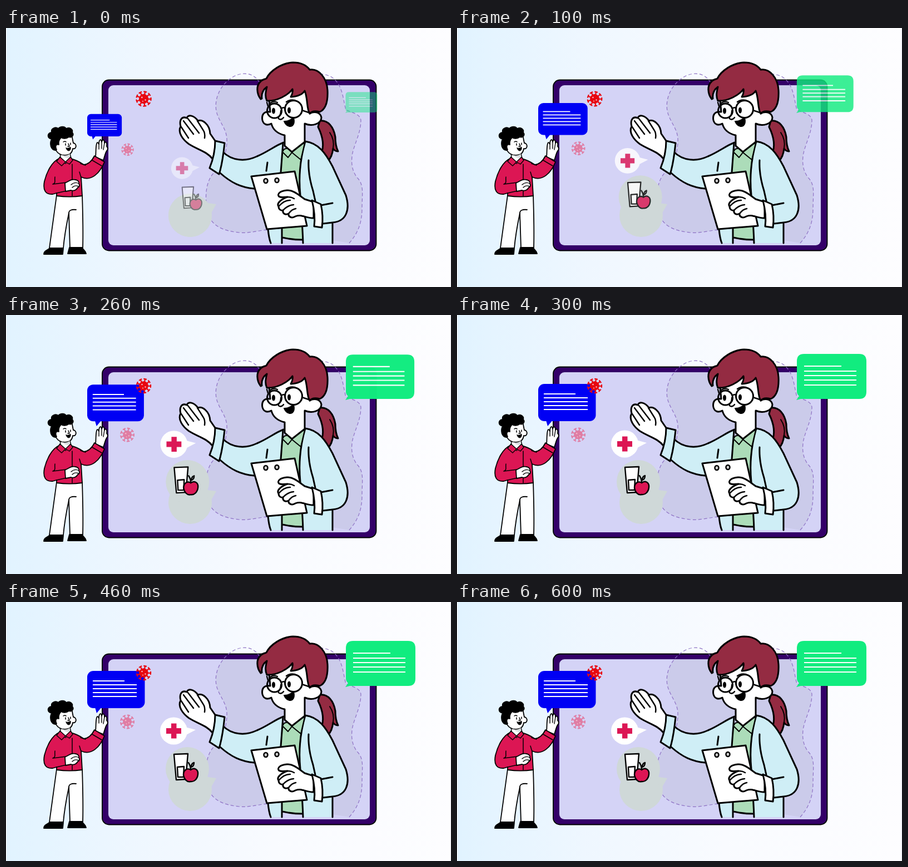
Write an HTML page that moves like this. It is 800x466 px and loops after 700 ms.

```html
<!DOCTYPE html>
<html lang="en">
<head>
<meta charset="utf-8">
<title>Online consultation</title>
<style>
  html, body { margin: 0; width: 100%; height: 100%; overflow: hidden; background: #fff; }
  svg { display: block; width: 100%; height: 100%; }
  .ink { stroke: #000; stroke-linecap: round; stroke-linejoin: round; fill: none; }
  .white { fill: #fff; }
  .coat { fill: #cfeef6; }
  .hair { fill: #942b42; }
  .shirt { fill: #acdcb9; }
  .red { fill: #dc1654; }
  .solid { fill: #000; }
</style>
</head>
<body>
<svg viewBox="0 0 800 466" preserveAspectRatio="none">
  <defs>
    <linearGradient id="sky">
      <stop offset="0" stop-color="#e1f3ff"/>
      <stop offset=".3" stop-color="#eff7ff"/>
      <stop offset=".6" stop-color="#f9fbff"/>
      <stop offset="1" stop-color="#fdfdff"/>
    </linearGradient>
    <clipPath id="screen"><rect x="184" y="103" width="470" height="285" rx="9"/></clipPath>
    <path id="cloud" d="M617 387C633 369 640 350 640 325C640 300 644 284 633 271C621 258 620 240 623 225C627 207 638 188 638 166C637 154 620 152 611 147C606 130 606 106 590 92C575 77 540 82 510 94C480 108 465 112 453 94C443 80 423 79 408 88C386 101 374 126 378 149C382 168 396 180 397 199C398 224 388 246 373 261C359 277 357 304 362 329C367 356 390 365 419 368C440 370 457 363 473 363"/>
    <g id="virus">
      <circle r="7.800"/>
      <g id="spikes"/>
      <g fill="#f7b9c8" stroke="none"><circle cx="-3" cy="-2.500" r="1.300"/><circle cx="3" cy="2" r="1.200"/><circle cx="-1.500" cy="4" r="1"/></g>
    </g>
  </defs>

  <rect width="800" height="466" fill="url(#sky)"/>
  <path d="M.5 0V466" stroke="#fff"/>
  <path d="M799.5 0V466" stroke="#e9e9ef"/>

  <!-- tablet -->
  <rect x="173" y="93.500" width="492.500" height="307" rx="12" fill="#340068" stroke="#000" stroke-width="1.800"/>
  <rect x="184" y="103" width="470" height="288" rx="9" fill="#d4d3f6"/>
  <use href="#cloud" fill="#cbcbea" clip-path="url(#screen)"/>
  <use href="#cloud" fill="none" stroke="#8e72c4" stroke-width="1.200" stroke-dasharray="6 4"/>

  <!-- diet and medicine -->
  <g fill="#cfd8d8">
    <circle cx="331" cy="337" r="39"/>
    <path d="M356 314L378 317L366 338Z"/>
    <circle id="halo" r="39"/>
  </g>
  <g id="diet">
    <g class="ink" stroke-width="2.400">
      <path class="white" d="M302 274L327 273L323 319L306 320Z"/>
      <path class="white" d="M308 297L320 296L319 315L309 315Z"/>
      <path class="red" d="M332 302C338 297 346 301 345 310C344 319 338 324 332 323C325 325 320 318 319 311C319 302 326 298 332 302Z"/>
      <path d="M332 301C332 296 330 292 328 289M333 297C333 293 335 290 338 289C338 293 337 296 333 297"/>
    </g>
  </g>
  <g id="medicine">
    <circle cx="301.500" cy="232" r="24.500" fill="#fff"/>
    <path d="M322 225L341 230L322 240Z" fill="#fff"/>
    <path class="red" d="M297 218.500h9.500v8.500h8.500v10h-8.500v8.500h-9.500v-8.500h-9v-10h9Z"/>
  </g>

  <!-- doctor -->
  <g class="ink" stroke-width="3">
    <path class="hair" d="M564 167C579 165 589 178 592 196C592 206 594 216 597 222C593 222 590 220 588 217C587 226 584 234 579 239C577 233 574 229 566 228C573 212 569 194 561 178Z"/>
    <path d="M582 188C588 197 590 207 588 217" stroke-width="2"/>
    <path class="white" d="M372 236C361 222 345 219 329 209C318 201 308 188 314 177C311 166 316 158 325 162C328 155 338 157 345 167C353 164 366 173 367 190L378 206Z"/>
    <path d="M319 167L337 191M327 163L347 189M344 167L354 183M315 178L328 198M354 183C357 187 358 192 357 198" stroke-width="2.500"/>

    <path class="shirt" stroke="none" d="M495 220L537 207L535 381L495 378Z"/>
    <path class="coat" stroke="none" d="M499 206C485 211 470 223 451 231C430 241 406 239 390 223L383 260C405 279 423 287 446 289L470 363L474 387H496L494 250Z"/>
    <path d="M499 206C485 211 470 223 451 231C430 241 406 239 390 223M384 260C405 279 423 287 446 289M471 362C472 372 473 380 476 387M470 242L468 257M498 207L494 260M496 360V387M497 377C510 380 522 381 533 381"/>
    <path class="coat" d="M376 203L393 207C391 226 389 245 383 263L366 252C373 235 376 219 376 203Z"/>
    <path class="coat" stroke="none" d="M538 204C562 207 575 226 587 249L612 304C617 327 613 346 587 351L587 387H534C533 350 530 327 529 300C526 270 529 235 538 204Z"/>
    <path d="M534 387C533 350 530 327 529 300C526 270 529 235 538 204C562 207 575 226 587 249L611 301C619 327 612 348 587 350L570 352M587 351V387M544 238C543 258 546 274 552 293L556 311M566 319L587 315"/>

    <path class="shirt" d="M500 218L497 223L507 233L514 224L530 237L537 207Z" stroke-width="2"/>
    <path class="white" d="M475 151C464 149 459 156 461 166C463 174 470 176 477 172C480 184 488 190 501 193L501 212L514 223L537 205V172C551 178 567 172 567 161C565 150 552 150 546 154L538 108L472 118Z"/>
    <path class="hair" d="M458 128C450 118 450 103 457 97C461 92 467 92 468 91C475 77 495 63 516 62C530 62 540 67 546 75C562 72 577 90 578 112C579 132 575 146 564 151C557 149 550 149 546 154C540 145 543 128 537 113C534 118 526 123 512 124C515 119 516 115 515 110C507 121 487 132 469 131C465 123 467 114 469 106C462 111 459 119 460 127Z"/>
    <circle cx="482.500" cy="149" r="13"/>
    <circle cx="517" cy="146" r="15.500"/>
    <path d="M495 145Q498 142 502 144M532 148L547 153M471 141L469 134M473 137Q480 130 488 134M504 133Q511 128 519 130M494 149C495 158 488 160 490 163C493 166 497 164 499 161" stroke-width="2.400"/>
    <g class="solid" stroke="none">
      <ellipse cx="481" cy="149" rx="3" ry="5.500"/>
      <ellipse cx="509" cy="148" rx="3" ry="5.500"/>
    </g>
    <path class="solid" d="M500 168C508 168 513 165 517 161C519 169 518 176 511 177C506 177 502 173 500 168Z" stroke-width="2"/>

    <path class="white" d="M441 267L519 258L541 356L469 362Z"/>
    <g fill="#ccc" stroke-width="2.500">
      <ellipse cx="467" cy="275" rx="3.500" ry="4"/>
      <ellipse cx="487" cy="274" rx="3.500" ry="4"/>
    </g>
    <path class="white" d="M553 313L537 308C527 301 516 291 505 292C493 293 488 298 490 302C492 306 500 304 506 304C494 308 486 316 490 321C490 327 495 329 498 328C497 334 502 337 508 334C507 340 514 343 520 339C530 334 541 343 553 342Z"/>
    <path d="M506 304Q513 304 518 307M490 321Q501 309 511 310M498 328Q506 319 517 318M508 334Q514 326 521 325" stroke-width="2.500"/>
    <path class="white" d="M550 310L566 317C569 330 570 344 568 359L554 357C556 342 554 326 550 310Z"/>
  </g>

  <!-- patient -->
  <g class="ink" stroke-width="1.800">
    <path class="white" d="M91 301L78 396H103C105 374 109 352 113 333L115 396H138C139 362 138 332 137 301Z"/>
    <path d="M113 333C113 328 118 326 126 327"/>
    <path class="solid" d="M79 396C74 400 68 401 68 407H102L103 397Z"/>
    <path class="solid" d="M114 395L111 406H144C143 400 138 399 137 395Z"/>
    <path class="white" d="M161 232C162 224 161 215 163 208C164 204 166 207 167 209C167 201 171 198 172 205C174 199 177 201 177 207C180 203 182 207 181 213C183 215 184 218 181 221C178 226 177 232 175 238Z"/>
    <path d="M167 209V218M172 205V217M177 207L175 219" stroke-width="1.400"/>
    <path class="red" d="M97 234C82 240 73 260 69 276C66 292 71 300 84 299L91 297V302C106 304 122 304 137 302L135 268C153 277 169 261 177 241L159 230C155 238 149 245 140 246C134 242 125 237 116 235Z"/>
    <path d="M88 268C87 275 90 279 84 281L108 278M91 297L109 293M119 245V302M135 269L132 259M155 238L172 248M134 244L143 247" stroke-width="1.500"/>
    <path class="white" d="M106 279C113 276 118 271 124 273C129 273 132 277 131 280C133 283 132 286 129 287C127 291 122 294 117 292L107 294Z"/>
    <path d="M117 282Q124 276 131 280M119 287Q124 282 130 285" stroke-width="1.400"/>
    <path class="white" d="M97 222L98 234L107 244L117 234L115 226Z" stroke-width="1.400"/>
    <path class="red" d="M97 232L91 240L100 248L107 241ZM116 232L107 241L114 245L120 238Z" stroke-width="1.400"/>
    <path class="white" d="M87 199C85 218 92 229 106 229C115 229 119 224 120 217C127 219 128 208 121 207L118 192Z"/>
    <path d="M99 227C104 231 111 230 115 226L114 233Q105 235 99 227" fill="#d8dcde" stroke="none"/>
    <path class="solid" d="M89 220C80 219 78 208 82 200C73 198 74 188 82 188C80 181 89 177 94 181C98 176 106 177 108 181C115 177 121 183 119 188C123 192 119 198 113 196C108 200 102 199 99 197C96 201 94 204 95 210C90 208 88 213 91 219Z"/>
    <path d="M107 208v3M116 207v3M112 208L114 213H111M103 205q3-2 5 0" stroke-width="1.500"/>
    <path class="solid" d="M108 216Q113 217 116 214Q117 221 112 221Q109 220 108 216Z" stroke-width="1"/>
  </g>

  <!-- speech -->
  <g id="question">
    <path d="M159 186L163 200L172 189Z" fill="#0000f4"/>
    <rect x="146" y="124" width="103.500" height="67" rx="11" fill="#0000f4"/>
    <path d="M156 142H213M156 149H235M156 156H235M156 163H235M156 170H235" stroke="#fff" stroke-width="2"/>
  </g>
  <g id="answer">
    <path d="M624 70H723Q736 70 736 83V138Q736 151 723 151H618L610 153L615 146Q611 142 611 138V83Q611 70 624 70Z" fill="#11ec7f"/>
    <path d="M624 92H691M624 101H718M624 109H718M624 117H718M624 126H718" stroke="#fff" stroke-width="2.200"/>
  </g>
  <use id="redVirus" href="#virus" fill="#e8060f" stroke="#e8060f"/>
  <use id="pinkVirus" href="#virus" fill="#df7da4" stroke="#df7da4"/>
</svg>
<script>
const LOOP = 700, TICK = 100, SPIKES = 9;
const $ = id => document.getElementById(id);

$('spikes').innerHTML = Array.from({ length: SPIKES }, (_, i) =>
  `<path transform="rotate(${i * 360 / SPIKES + 12})" d="M0 -7V-12.500M-2 -12.500H2" stroke-width="2.200" stroke-linecap="round"/>`
).join('');

// Remaining distance of a quadratic ease-out.
const remaining = (t, start, speed) => Math.max(0, start - speed * t) ** 2;

function place(id, x, y, scale, dx = 0, dy = 0, opacity = 1) {
  const node = $(id);
  node.setAttribute('transform', `translate(${x + dx} ${y + dy}) scale(${scale}) translate(${-x} ${-y})`);
  node.setAttribute('opacity', opacity);
}

function placeVirus(id, x, y, scale) {
  $(id).setAttribute('transform', `translate(${x} ${y}) scale(${scale})`);
}

function draw(ms) {
  // The motion advances in held steps of one tick.
  const t = Math.floor((ms % LOOP) / TICK) * TICK;
  const blue = remaining(t, 0.632, 0.002545);
  const rest = remaining(t, 0.7376, 0.003077);
  const shown = 1 - rest;

  place('question', 146, 201, 1 - blue);
  place('answer', 610, 153, shown, 0, 0, shown);
  place('medicine', 301.5, 232, 1 - 0.368 * rest, 27.5 * rest, 37 * rest, shown);
  place('diet', 323, 298, 1 - 0.33 * rest, 20 * rest, 15 * rest, shown);

  const drop = (rest / 0.544) ** 2;
  $('halo').setAttribute('cx', 326 + 5 * Math.min(1, rest * 4));
  $('halo').setAttribute('cy', 300 + 37 * drop);
  placeVirus('redVirus', 247.5, 127.5, 1 + 0.08 * rest);
  placeVirus('pinkVirus', 218 + rest, 215.5 + 6 * rest, 0.95 - 0.25 * rest);
}

const start = performance.now();
function frame() {
  draw(performance.now() - start);
  requestAnimationFrame(frame);
}
frame();
</script>
</body>
</html>
```
